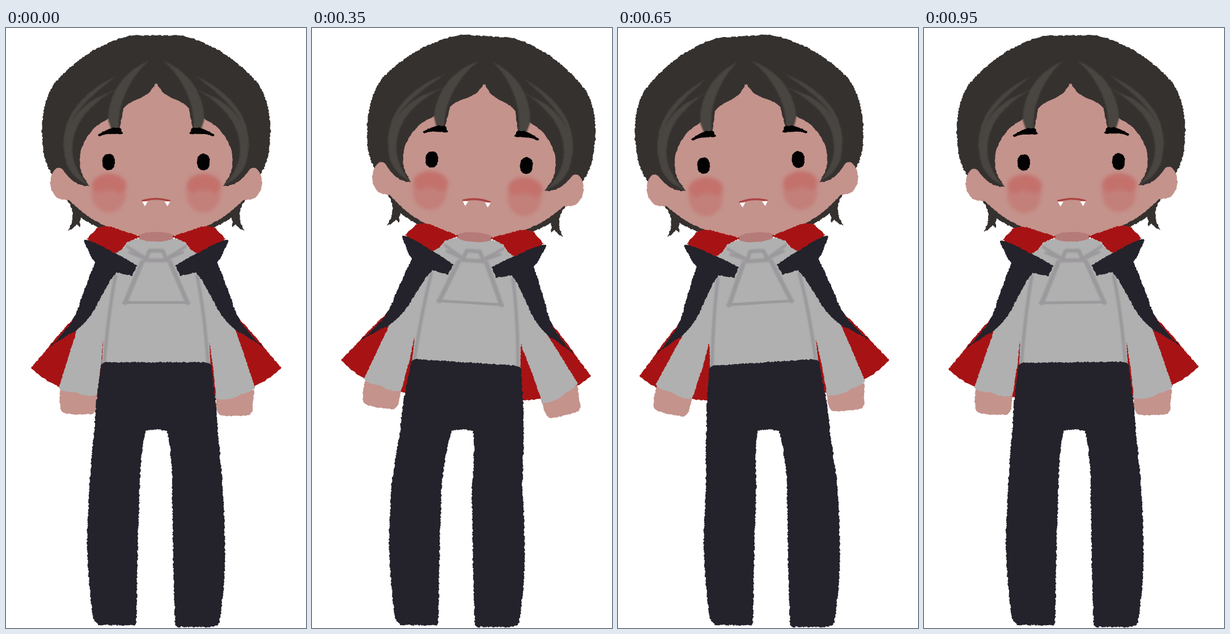
Write an HTML page that moves like this. It is 529 px wide and 1059 px high and loops after 1 s.

```html
<!DOCTYPE html>
<html lang="en">
<head>
<meta charset="utf-8">
<title>Swaying vampire</title>
<style>
html, body { margin: 0; width: 100%; height: 100%; overflow: hidden; background: #fff; }
svg { display: block; width: 100vw; height: 100vh; }
</style>
</head>
<body>
<svg id="stage" viewBox="0 0 529 1059">
  <defs>
    <filter id="soft" x="-30%" y="-30%" width="160%" height="160%"><feGaussianBlur stdDeviation="1"/></filter>
    <filter id="blush" x="-40%" y="-40%" width="180%" height="180%"><feGaussianBlur stdDeviation="3.5"/></filter>
  </defs>
</svg>
<script>
const NS = 'http://www.w3.org/2000/svg';
const LOOP = 1000, STEP = 50, MID = 264.8;
const HIP = { x: 265, y: 705 };
const C = {
  hair: '#35312f', shine: '#4a4541', skin: '#c4938c', neck: '#b57b78',
  red: '#a71314', navy: '#24222b', shirt: '#b0b0b0', seam: '#9b999c', ink: '#020203'
};

const svg = document.getElementById('stage');

function add(parent, tag, attrs = {}) {
  const el = document.createElementNS(NS, tag);
  for (const k in attrs) el.setAttribute(k, attrs[k]);
  return parent.appendChild(el);
}

let seed = 7;
function rnd() {
  seed = (seed * 16807) % 2147483647;
  return seed / 2147483647 * 2 - 1;
}

// Samples a path and gives its edge a crayon-like tooth.
const ruler = add(svg.querySelector('defs'), 'path');
function outline(d, rough) {
  ruler.setAttribute('d', d);
  const len = ruler.getTotalLength(), pts = [];
  for (let s = 0; s < len; s += 2) {
    const p = ruler.getPointAtLength(s);
    pts.push([p.x + rnd() * rough, p.y + rnd() * rough]);
  }
  return pts;
}
const toD = pts => 'M' + pts.map(p => p[0].toFixed(2) + ' ' + p[1].toFixed(2)).join('L') + 'Z';
const mirror = pts => pts.map(([x, y]) => [2 * MID - x, y]);

function shape(parent, d, fill, rough = 1) {
  return add(parent, 'path', { d: toD(outline(d, rough)), fill });
}
// Draws a left-hand shape and its mirror image.
function pair(parent, d, fill, rough = 1, attrs = {}) {
  const pts = outline(d, rough);
  add(parent, 'path', { d: toD(pts), fill, ...attrs });
  add(parent, 'path', { d: toD(mirror(pts)), fill, ...attrs });
}
function line(parent, d, width, stroke = C.seam) {
  add(parent, 'path', {
    d, stroke, 'stroke-width': width, fill: 'none',
    'stroke-linecap': 'round', 'stroke-linejoin': 'round', filter: 'url(#soft)'
  });
}
function oval(parent, cx, cy, rx, ry, fill, attrs = {}) {
  add(parent, 'ellipse', { cx, cy, rx, ry, fill, ...attrs });
}

const body = add(svg, 'g');

// Back of the cape
pair(body, 'M80 556L75 563L44 600Q64 620 95 634Q130 648 165 651L268 655L268 500L130 500Z', C.red, .8);

// Forearms
const armL = add(body, 'g'), armR = add(body, 'g');
shape(armL, 'M96 634Q93 655 96 672Q99 681 112 681Q130 683 153 681Q160 677 160 664L161 640Z', C.skin, .8);
shape(armL, 'M126 530L93 635Q98 643 124 643Q144 653 161 647L168 590L171 550L160 515Z', C.shirt, .7);
shape(armR, 'M369 645L371 670Q372 684 382 684Q405 686 429 683Q435 680 435 668L438 638Z', C.skin, .8);
shape(armR, 'M404 530L439 634Q434 643 415 646Q398 658 371 655L365 600L358 548L370 515Z', C.shirt, .7);

// Shirt
pair(body, 'M209 386Q213 372 236 372L236 360L268 360L268 603L169 603L171 551L150 557L126 531Q150 500 165 470Q180 440 195 425L190 395Z', C.shirt, .6);
line(body, 'M193 438Q181 500 173 591', 6);
line(body, 'M337 438Q350 500 356 591', 6);

// Jabot
line(body, 'M214 386Q226 394 243 404M218 396L244 407', 5);
line(body, 'M316 386Q304 394 287 404M312 396L286 407', 5);
line(body, 'M253 393L276 393L284 410L246 410Z', 7);
line(body, 'M240 413L210 485M289 413L320 485', 8);
line(body, 'M211 485Q265 481 319 486', 11);

// Cape front
pair(body, 'M137 375L152 373Q168 380 192 397L231 419L222 438L195 431Q180 449 165 480Q150 512 125 533Q97 549 75 564Q113 530 126 498Q141 452 157 414Q146 398 137 375Z', C.navy);

// Head
pair(body, 'M106 298L117 322Q119 342 109 358Q121 354 125 346L131 352Q129 342 132 335L160 351L190 358L190 320Z', C.hair);
pair(body, 'M80 256Q65 235 64 195Q60 142 82 103Q100 78 130 56Q170 25 221 13L270 13L270 300L120 300Z', C.hair, 1.1);
pair(body, 'M264 97Q256 115 238 123Q212 133 207 143L200 178L181 160Q148 175 134 210Q126 235 134 258L147 279Q125 280 108 260Q101 250 95 246Q80 248 78 273Q80 300 100 303L112 304Q150 345 210 362Q235 369 268 369L268 104Z', C.skin, .7);

const shine = { filter: 'url(#soft)' };
pair(body, 'M222 95Q165 118 135 158Q116 185 117 220Q121 252 145 277Q118 266 107 240Q99 215 104 185Q118 150 155 126Z', C.shine, .5, shine);
pair(body, 'M196 84Q125 118 107 170Q101 195 102 215Q108 180 118 160Q140 125 196 84Z', C.shine, .5, shine);
pair(body, 'M252 58Q210 76 192 112Q180 138 180 160L186 182L199 180Q197 150 208 122Q222 85 252 58Z', C.shine, .5, shine);

// Cheeks
for (const x of [181, 348]) {
  oval(body, x, 292, 30, 33, '#c47f79', { filter: 'url(#blush)' });
  oval(body, x + 1, 277, 30, 19, '#c4716c', { filter: 'url(#blush)' });
  oval(body, x + 1, 304, 22, 18, '#c3807a', { filter: 'url(#blush)' });
}

// Eyes, brows, mouth
for (const x of [181, 348]) {
  shape(body, `M${x - 11} 236Q${x - 11} 222 ${x} 222Q${x + 11} 222 ${x + 11} 236Q${x + 11} 251 ${x} 251Q${x - 11} 251 ${x - 11} 236Z`, C.ink, .7);
}
pair(body, 'M162 189Q176 178 190 176L202 176L206 187L186 187Q175 187 165 191Z', C.ink, .8);
add(body, 'path', { d: 'M241 305Q264 298 288 305', fill: 'none', stroke: '#ab4543', 'stroke-width': 3.5, 'stroke-linecap': 'round' });
pair(body, 'M240 306L250 306L245 315Z', '#fff', .2);

// Neck and collar
shape(body, 'M231 368Q240 360 265 360Q290 360 299 368Q292 377 265 377Q238 377 231 368Z', C.neck, .6);
pair(body, 'M142 373L162 352Q175 348 188 352L237 368Q225 374 213 378Q207 392 192 398Q168 383 142 373Z', C.red, .8);

// Trousers bend at the hips, and the lower legs slide sideways
const trousers = add(svg, 'path', { fill: C.navy });
const cloth = outline('M168 594Q172 590 180 590L350 590Q360 591 362 597L370 660Q374 720 378 760Q386 850 386 920Q386 990 376 1050Q372 1057 355 1057L302 1057Q298 1055 298 1048Q293 900 293 790Q290 735 284 711Q265 707 246 711Q238 750 236 800Q231 950 230 1050Q229 1055 222 1054L165 1054Q156 1052 153 1035Q144 980 143 900Q146 800 155 715L159 660Z', 1.2);

function bend(a, left, right) {
  const c = Math.cos(a), s = Math.sin(a);
  return cloth.map(([x, y]) => {
    const dx = x - HIP.x, dy = y - HIP.y;
    if (dy < 0) return [HIP.x + dx * c - dy * s, HIP.y + dx * s + dy * c];
    const k = Math.min(1, Math.max(0, (y - 712) / 95));
    return [x + k * (dx < 0 ? left : right), y];
  });
}

// Linear keys: 0, a at one third, b at two thirds, 0 at the end.
function key(u, a, b) {
  const v = u * 3;
  if (v < 1) return a * v;
  if (v < 2) return a + (b - a) * (v - 1);
  return b * (3 - v);
}
const turn = (el, deg, x, y) => el.setAttribute('transform', `rotate(${deg.toFixed(3)} ${x} ${y})`);

function draw(ms) {
  const u = Math.floor((ms % LOOP) / STEP) * STEP / LOOP;
  const sway = key(u, 4.1, -4.1);
  turn(body, sway, HIP.x, HIP.y);
  turn(armL, key(u, 3.7, 15.5), 154, 545);
  turn(armR, key(u, -18, 0), 382, 545);
  trousers.setAttribute('d', toD(bend(sway * Math.PI / 180, key(u, -8, 9), key(u, -12, 6))));
}

let start;
function tick(now) {
  if (start === undefined) start = now;
  draw(Math.max(0, now - start));
  requestAnimationFrame(tick);
}
draw(0);
requestAnimationFrame(tick);
</script>
</body>
</html>
```
